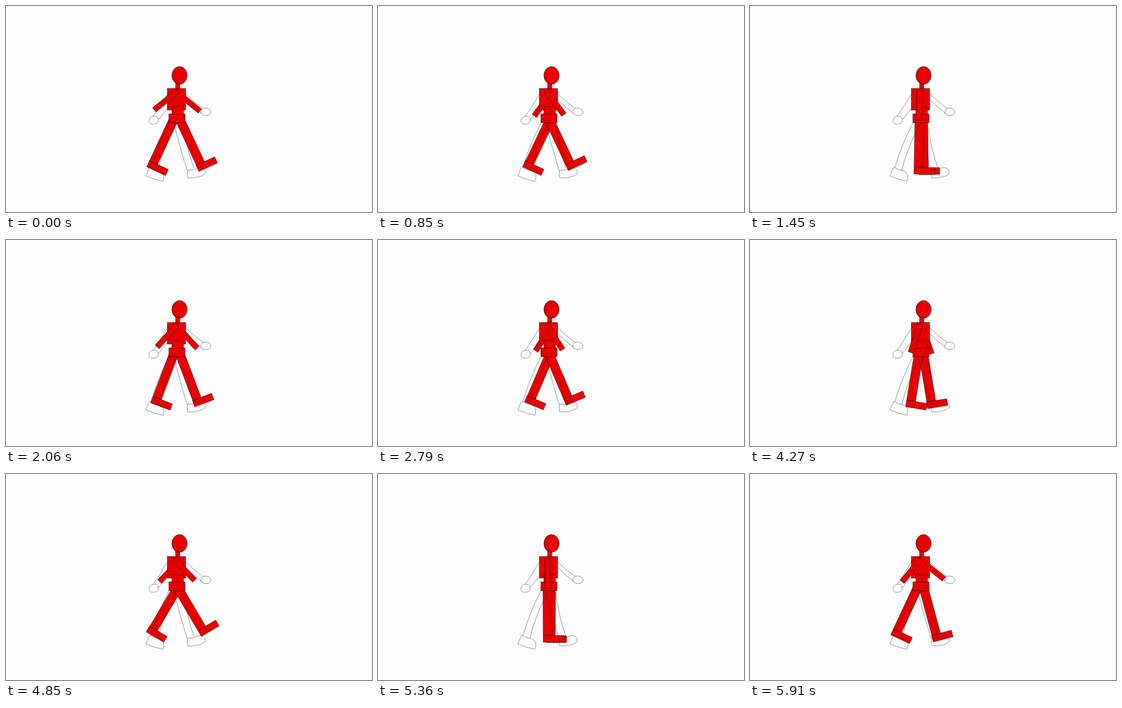
An HTML page that plays this animation: 600 by 338 pixels, repeating every 5.94 s.

```html
<!DOCTYPE html>
<html>
<head>
<meta charset="utf-8">
<style>
html, body { margin: 0; width: 100%; height: 100%; overflow: hidden; background: #fdfcfd; }
svg { display: block; width: 100vw; height: 100vh; }
.body { fill: #ea0000; stroke: #200a10; stroke-width: .8; stroke-opacity: .7; }
.sketch { fill: none; stroke: #333; stroke-width: .7; stroke-opacity: .7; }
</style>
</head>
<body>
<svg viewBox="0 0 600 338">
  <g class="body">
    <rect id="armD" x="278.5" y="140" width="9" height="49"/>
    <g id="legB"><rect x="276.5" y="182" width="14.5" height="84"/><rect x="276" y="265.5" width="33.5" height="11"/></g>
    <g id="legA"><rect x="270.5" y="182" width="14.5" height="83"/><rect x="270.5" y="265" width="34" height="11"/></g>
    <rect x="267" y="177" width="26.5" height="14.5"/>
    <rect x="278" y="124" width="7" height="13"/>
    <ellipse cx="284.3" cy="114" rx="12.4" ry="14.6"/>
    <rect x="264.5" y="135.3" width="30" height="35.5"/>
    <rect x="272" y="165" width="19" height="12.5"/>
    <rect id="armC" x="273.5" y="138" width="9" height="49"/>
  </g>
  <g class="sketch">
    <ellipse cx="285.3" cy="113.7" rx="12.2" ry="14.2"/>
    <path d="M276 133Q268 138 258 155Q248 172 241 181M277 150Q262 172 250 186"/>
    <path d="M241 181C233 182 232 192 239 194C247 195 252 190 249 184Q247 180 241 181"/>
    <path d="M293 143Q309 158 323 168M293 152Q304 163 320 176"/>
    <path d="M323 168C330 166 337 170 336 175C334 181 325 181 320 177Q318 172 323 168"/>
    <path d="M267 190L293 185M268 190Q249 226 237.5 265M278 194Q255 240 249 270"/>
    <path d="M235.7 264.5Q231 273 229.5 279Q243 285 257 287.5Q260 281 258 277Q256 271 250 270Q243 269 235.7 264.5"/>
    <path d="M275 192Q287 238 297 270M291 195Q298 240 308 266"/>
    <path d="M298 269Q296 276 298 282Q309 283 317 280Q327 278 327 272Q325 265 316 265Q306 271 298 269"/>
  </g>
</svg>
<script>
const LOOP = 5940, CYCLE = 1967, LAST = 5364;
// Stride from 1 (first contact pose) to -1 (opposite pose), linear between keys.
const keys = [[0, 1], [535, 0], [980, -1], [1430, 0], [CYCLE, 1]];

function stride(t) {
  const p = t % CYCLE;
  const i = keys.findIndex(k => k[0] > p);
  const [t0, a] = keys[i - 1], [t1, b] = keys[i];
  return a + (b - a) * (p - t0) / (t1 - t0);
}

function turn(id, angle, x, y) {
  document.getElementById(id).setAttribute("transform", `rotate(${angle} ${x} ${y})`);
}

function draw(now) {
  const t = now % LOOP;
  const ending = t > LAST;
  const s = ending ? Math.min(1, (t - LAST) / 537) : stride(t);
  const leg = s * (s > 0 ? 25 : 35.5), arm = s * 51;
  // One leg and one arm fall short on the last step.
  turn("legA", leg, 278, 180);
  turn("legB", -leg * (ending ? .6 : 1), 285, 183);
  turn("armC", arm * (ending ? .77 : 1), 278, 142);
  turn("armD", -arm, 283, 144);
  requestAnimationFrame(draw);
}
requestAnimationFrame(draw);
</script>
</body>
</html>
```
